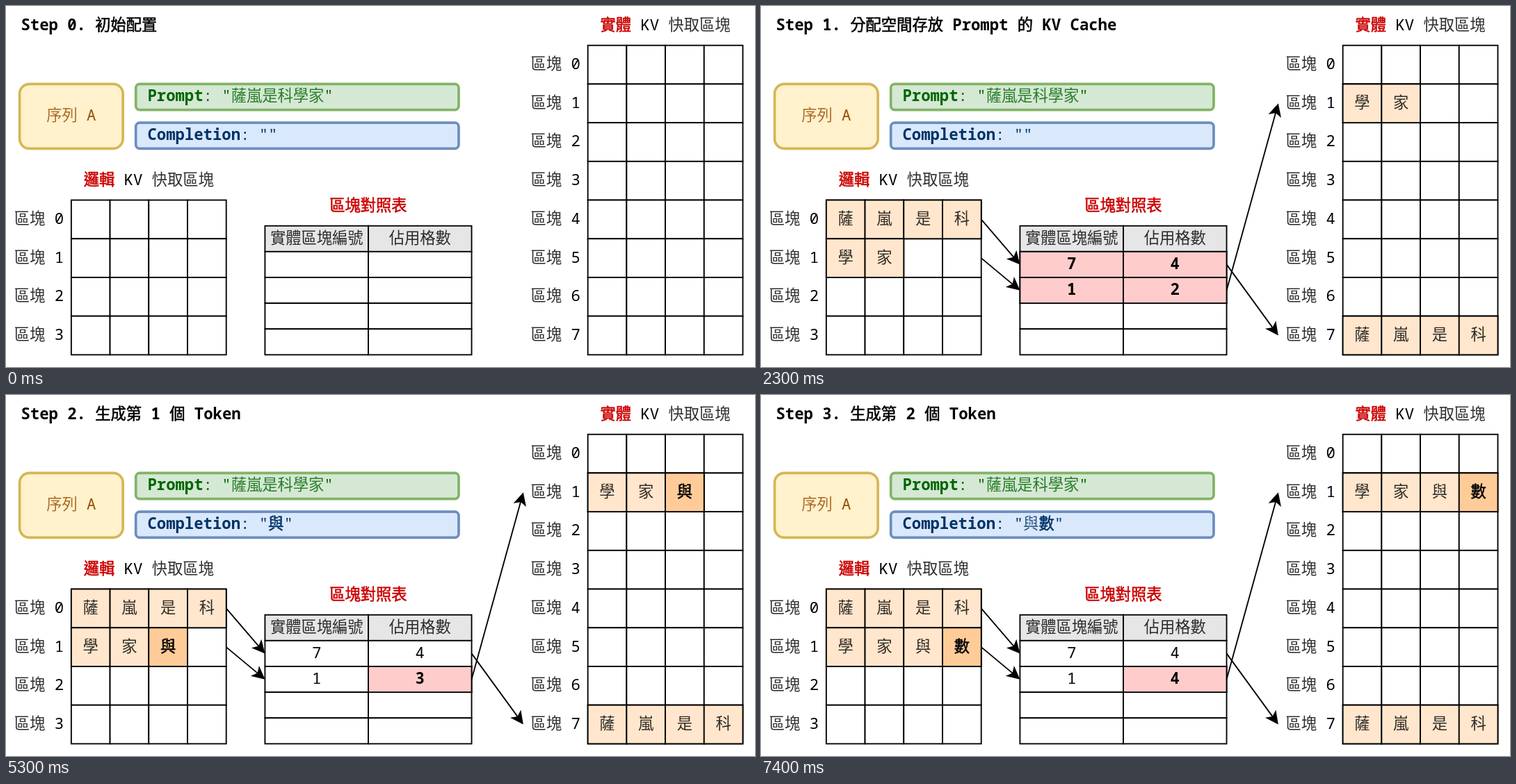
Animation, 1077 px wide and 520 px high, one loop 8 s. Source, as an HTML page:

```html
<!DOCTYPE html>
<html lang="zh-Hant">
<head>
<meta charset="utf-8">
<title>KV block table</title>
<style>
  html, body { margin: 0; width: 100%; height: 100%; overflow: hidden; background: #fff; }
  svg { display: block; width: 1077px; height: 520px; }
  text { font: 24px "Noto Sans Mono", "Noto Sans CJK TC", monospace; white-space: pre; fill: currentColor; }
  .b { font-weight: 700; }
  .red { color: #c00; }
  .cjk { font-family: "Noto Sans CJK TC", sans-serif; font-weight: 300; fill-opacity: .82; }
  .cjk.b { font-weight: 400; fill-opacity: 1; stroke: currentColor; stroke-width: .6px; }
</style>
</head>
<body>
<svg viewBox="0 0 1077 520"><g id="stage" transform="translate(1 1) scale(.9285)"></g></svg>
<script>
const CELL = 60, ROW = 40;
const stage = document.getElementById('stage');

function add(parent, tag, attrs, content) {
  const el = document.createElementNS('http://www.w3.org/2000/svg', tag);
  for (const k in attrs) el.setAttribute(k, attrs[k]);
  if (content) el.textContent = content;
  parent.append(el);
  return el;
}

// *bold* and ^red bold^ markup; each run is split by script
function label(g, x, y, str, { color = '#000', anchor = 'middle' } = {}) {
  const el = add(g, 'text', { x, y: y + 7, color, 'text-anchor': anchor });
  for (const part of str.match(/\*[^*]+\*|\^[^^]+\^|[^*^]+/g)) {
    const style = { '*': 'b', '^': 'b red' }[part[0]] || '';
    const body = style ? part.slice(1, -1) : part;
    for (const run of body.match(/[\u4e00-\u9fff]+|[^\u4e00-\u9fff]+/g)) {
      const cjk = /[\u4e00-\u9fff]/.test(run) ? ' cjk' : '';
      add(el, 'tspan', { class: style + cjk }, run);
    }
  }
}

function box(g, x, y, width, height, fill, stroke = '#000', sw = 2, rx = 0) {
  add(g, 'rect', { x, y, width, height, fill, stroke, 'stroke-width': sw, rx });
}

function grid(g, x, y, rows) {
  for (let r = 0; r < rows; r++) {
    label(g, x - 50, y + r * CELL + 30, '區塊 ' + r);
    for (let c = 0; c < 4; c++) box(g, x + c * CELL, y + r * CELL, CELL, CELL, '#fff');
  }
}

function tokens(g, x, y, str, fresh) {
  [...str].forEach((ch, i) => {
    const hot = ch === fresh;
    box(g, x + i * CELL, y, CELL, CELL, hot ? '#ffcc99' : '#ffe6cc');
    label(g, x + i * CELL + 30, y + 30, hot ? `*${ch}*` : ch);
  });
}

function entry(g, col, row, value, hot) {
  const x = 400 + col * 160, y = 380 + row * ROW;
  if (hot) box(g, x, y, 160, ROW, '#ffcccc');
  label(g, x + 80, y + 20, hot ? `*${value}*` : value);
}

function arrow(g, x1, y1, x2, y2) {
  const d = Math.hypot(x2 - x1, y2 - y1), ux = (x2 - x1) / d, uy = (y2 - y1) / d, size = 16;
  const at = (back, side) =>
    `${x2 - ux * (back + 2.2) - uy * side} ${y2 - uy * (back + 2.2) + ux * side}`;
  add(g, 'path', {
    d: `M${x1} ${y1}L${at(size * .75, 0)}M${at(0, 0)}L${at(size, size / 2)}L${at(size * .75, 0)}L${at(size, -size / 2)}Z`,
    stroke: '#000', 'stroke-width': 2, 'stroke-miterlimit': 10
  });
}

const NAME = '薩嵐', HEAD = NAME + '是科';

function base(g) {
  label(g, 1020, 30, '^實體^ KV 快取區塊');
  label(g, 220, 270, '^邏輯^ KV 快取區塊');
  label(g, 560, 310, '^區塊對照表^');
  grid(g, 900, 60, 8);
  grid(g, 100, 300, 4);
  for (let c = 0; c < 2; c++)
    for (let r = 0; r < 5; r++)
      box(g, 400 + c * 160, 340 + r * ROW, 160, ROW, r ? '#fff' : '#e6e6e6');
  label(g, 480, 360, '實體區塊編號');
  label(g, 640, 360, '佔用格數');
  box(g, 20, 120, 160, 100, '#fff2cc', '#d6b656', 4, 15);
  label(g, 100, 170, '序列 A', { color: '#994c00' });
  box(g, 200, 120, 500, 40, '#d5e8d4', '#82b366', 4, 6);
  label(g, 218, 140, `*Prompt*: "${NAME}是科學家"`, { color: '#006600', anchor: 'start' });
  box(g, 200, 180, 500, 40, '#dae8fc', '#6c8ebf', 4, 6);
}

const steps = [
  { at: 0, title: 'Step 0. 初始配置', out: '' },
  { at: 500, title: 'Step 1. 分配空間存放 Prompt 的 KV Cache', out: '', tail: '學家', used: 2 },
  { at: 3500, title: 'Step 2. 生成第 1 個 Token', out: '*與*', tail: '學家與', fresh: '與', used: 3 },
  { at: 6500, title: 'Step 3. 生成第 2 個 Token', out: '與*數*', tail: '學家與數', fresh: '數', used: 4 }
];
const LOOP = 8000;

function scene(step) {
  const g = add(stage, 'g', { visibility: 'hidden' });
  label(g, 22, 30, `*${step.title}*`, { anchor: 'start' });
  label(g, 218, 200, `*Completion*: "${step.out}"`, { color: '#003366', anchor: 'start' });
  if (!step.tail) return g;
  tokens(g, 100, 300, HEAD);
  tokens(g, 100, 360, step.tail, step.fresh);
  tokens(g, 900, 480, HEAD);
  tokens(g, 900, 120, step.tail, step.fresh);
  const first = !step.fresh;
  entry(g, 0, 0, '7', first);
  entry(g, 1, 0, '4', first);
  entry(g, 0, 1, '1', first);
  entry(g, 1, 1, String(step.used), true);
  arrow(g, 340, 330, 400, 400);
  arrow(g, 340, 390, 400, 440);
  arrow(g, 720, 400, 800, 510);
  arrow(g, 720, 440, 800, 150);
  return g;
}

base(stage);
const scenes = steps.map(scene);

function tick() {
  const t = performance.now() % LOOP;
  const now = steps.findLastIndex(s => t >= s.at);
  scenes.forEach((g, i) => g.setAttribute('visibility', i === now ? 'visible' : 'hidden'));
  requestAnimationFrame(tick);
}
tick();
</script>
</body>
</html>
```
